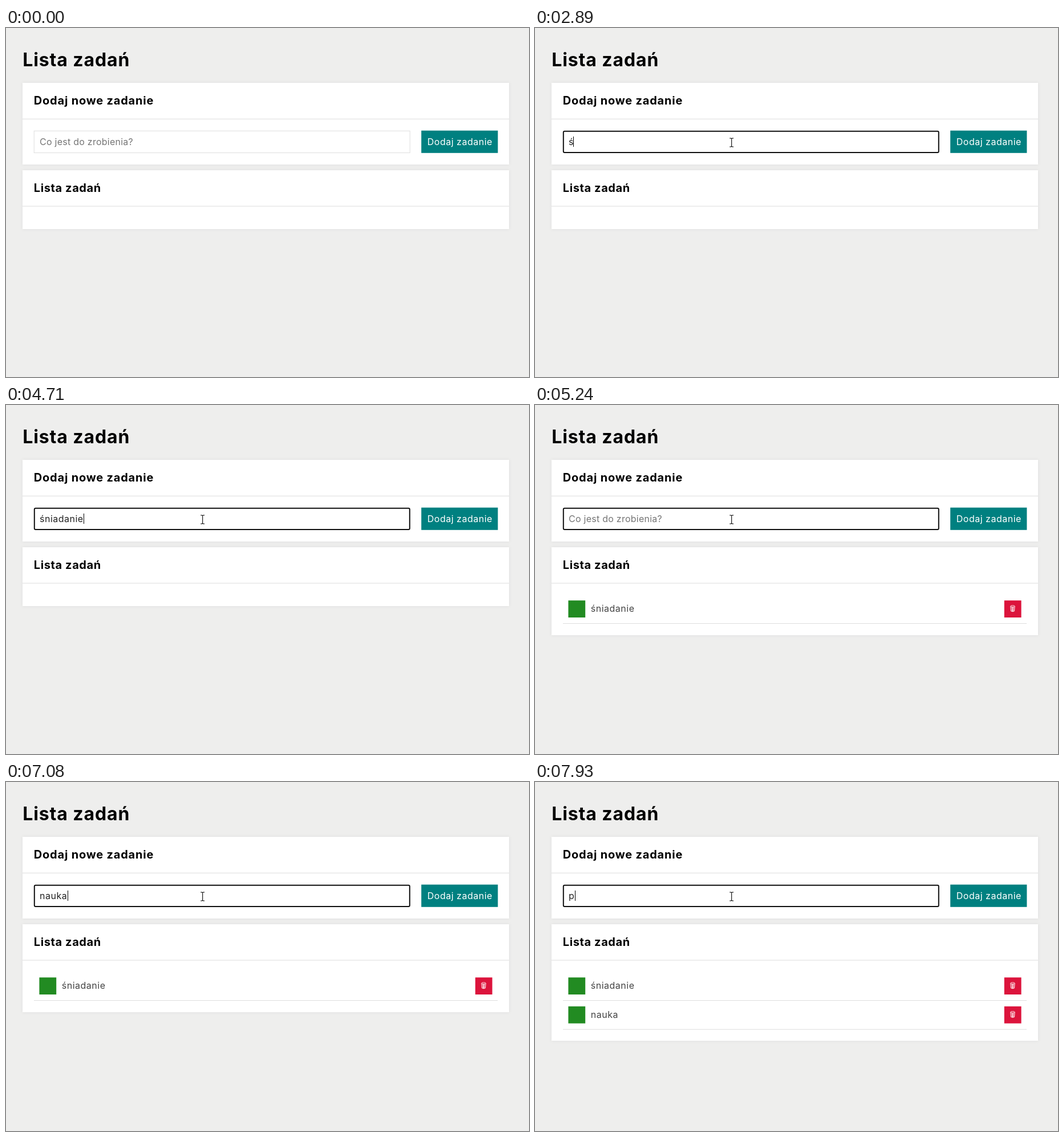
Recreate the animation shown at these times as an HTML page. Size 917x611 px, loop 8 s.

```html
<!DOCTYPE html>
<html lang="pl">
<head>
<meta charset="utf-8">
<title>Lista zadań</title>
<style>
  html, body { margin: 0; width: 100%; height: 100%; overflow: hidden; background: #eeeeed; }
  svg { display: block; width: 100vw; height: 100vh; background: #eeeeed; }
  text { font: 400 16px Inter, "Open Sans", sans-serif; font-optical-sizing: none; letter-spacing: .5px; white-space: pre; }
  .h1 { font-size: 32px; font-weight: 700; letter-spacing: .9px; }
  .h2 { font-size: 20px; font-weight: 700; letter-spacing: .8px; }
  .hint { fill: #757575; letter-spacing: .25px; }
  .card { fill: #fff; filter: drop-shadow(0 0 2.5px #ddd); }
  .line { fill: #ddd; }
</style>
</head>
<body>
<svg viewBox="0 0 917 611">
  <defs>
    <g id="bin" fill="none" stroke="#fff" stroke-width=".9">
      <ellipse cx="4" cy="1.8" rx="3.8" ry="1.3"/>
      <path d="M.3 2L1 10.3Q4 12 7 10.3L7.7 2M2.4 3.4L2.7 10.8M4 3.5V11M5.6 3.4L5.3 10.8"/>
    </g>
  </defs>

  <text class="h1" x="29.2" y="67">Lista zadań</text>

  <rect class="card" x="29" y="96" width="853" height="143"/>
  <rect class="line" x="29" y="158.8" width="853" height="1"/>
  <text class="h2" x="48.8" y="134">Dodaj nowe zadanie</text>
  <rect id="field" fill="#fff"/>
  <text id="hint" class="hint" x="59" y="204.5">Co jest do zrobienia?</text>
  <text id="typed" x="59" y="204.5" fill="#222"></text>
  <rect id="caret" y="190" width="1" height="18"/>
  <rect x="728.2" y="179.6" width="134.2" height="39.2" fill="#008080"/>
  <text x="738.8" y="204.5" fill="#fff">Dodaj zadanie</text>

  <rect id="list" class="card" x="29" y="249" width="853" height="103"/>
  <rect class="line" x="29" y="311.5" width="853" height="1"/>
  <text class="h2" x="48.8" y="287" style="letter-spacing:.6px">Lista zadań</text>
  <g id="rows"></g>

  <path id="arrow" d="M0 0V16.5L3.8 13L6.3 18.6L8.6 17.6L6.2 12.1H11.3Z" fill="#fff" stroke="#000"/>
  <path id="beam" d="M-3.5-7.5H-1L0-6.5L1-7.5H3.5M0-6.5V6.5M-3.5 7.5H-1L0 6.5L1 7.5H3.5" fill="none" stroke="#000" stroke-width="1.1"/>
</svg>
<script>
const LOOP = 8000, FOCUS = 2000, ENTER = 1170, STEP = 410 / 6;

// time, text in the field, caret x (0 = hidden)
const typing = [
  [0, '', 0], [FOCUS, '', 60], [2620, '', 0],
  [2890, 'ś', 67], [3420, 'ś', 0], [3520, 'śn', 77], [3620, 'śni', 81],
  [3820, 'śnia', 91], [4040, 'śniad', 102], [4240, 'śniada', 112],
  [4370, 'śniadan', 122], [4510, 'śniadani', 126], [4710, 'śniadanie', 136],
  [5240, '', 0], [5770, '', 60],
  [5900, 'n', 69], [6070, 'na', 80], [6200, 'nau', 90], [6600, 'nauk', 99],
  [7080, 'nauka', 108], [7340, '', 60], [7600, '', 0], [7930, 'p', 70]
];
const tasks = [[5240, 'śniadanie'], [7340, 'nauka']];
const path = [
  [284, 0], [287, 4], [290, 10], [299, 36], [310, 68],
  [330, 114], [347, 157], [349, 176], [346, 195], [344.7, 200.5]
];

const $ = id => document.getElementById(id);
const set = (el, attrs) => { for (const k in attrs) el.setAttribute(k, attrs[k]); };
const show = (el, on) => set(el, { visibility: on ? 'visible' : 'hidden' });

$('rows').innerHTML = tasks.map(([, name], i) => `
  <g transform="translate(0 ${i * 50.6})">
    <rect x="58.4" y="342.2" width="29.8" height="29.8" fill="#228b22"/>
    <text x="97.8" y="362" fill="#444">${name}</text>
    <rect x="822.8" y="342.2" width="29.8" height="29.8" fill="#dc143c"/>
    <use href="#bin" x="833.5" y="350.5"/>
    <rect class="line" x="49" y="382" width="813" height="1"/>
  </g>`).join('');
const rows = [...$('rows').children];

function drawField(t) {
  const [, text, x] = typing.filter(k => k[0] <= t).pop();
  $('typed').textContent = text;
  show($('hint'), !text);
  show($('caret'), x);
  set($('caret'), { x });
  set($('field'), t < FOCUS
    ? { x: 49.2, y: 180.2, width: 659, height: 38.2, rx: 0, stroke: '#ddd', 'stroke-width': 1 }
    : { x: 49.8, y: 180.8, width: 658, height: 37.2, rx: 2, stroke: '#101010', 'stroke-width': 2 });
}

function drawList(t) {
  const count = tasks.filter(k => k[0] <= t).length;
  rows.forEach((row, i) => show(row, i < count));
  set($('list'), { height: [103, 154, 204][count] });
}

function drawPointer(t) {
  const k = Math.min(path.length - 1, Math.floor((t - ENTER) / STEP + 1e-6));
  const [x, y] = path[Math.max(0, k)];
  const overField = y > 180 && y < 219 && x > 49 && x < 709;
  show($('arrow'), k >= 0 && !overField);
  show($('beam'), k >= 0 && overField);
  set($('arrow'), { transform: `translate(${x} ${y})` });
  set($('beam'), { transform: `translate(${x} ${y})` });
}

function draw(t) {
  drawField(t);
  drawList(t);
  drawPointer(t);
}

const start = performance.now();
function frame() {
  draw((performance.now() - start) % LOOP);
  requestAnimationFrame(frame);
}
frame();
</script>
</body>
</html>
```
